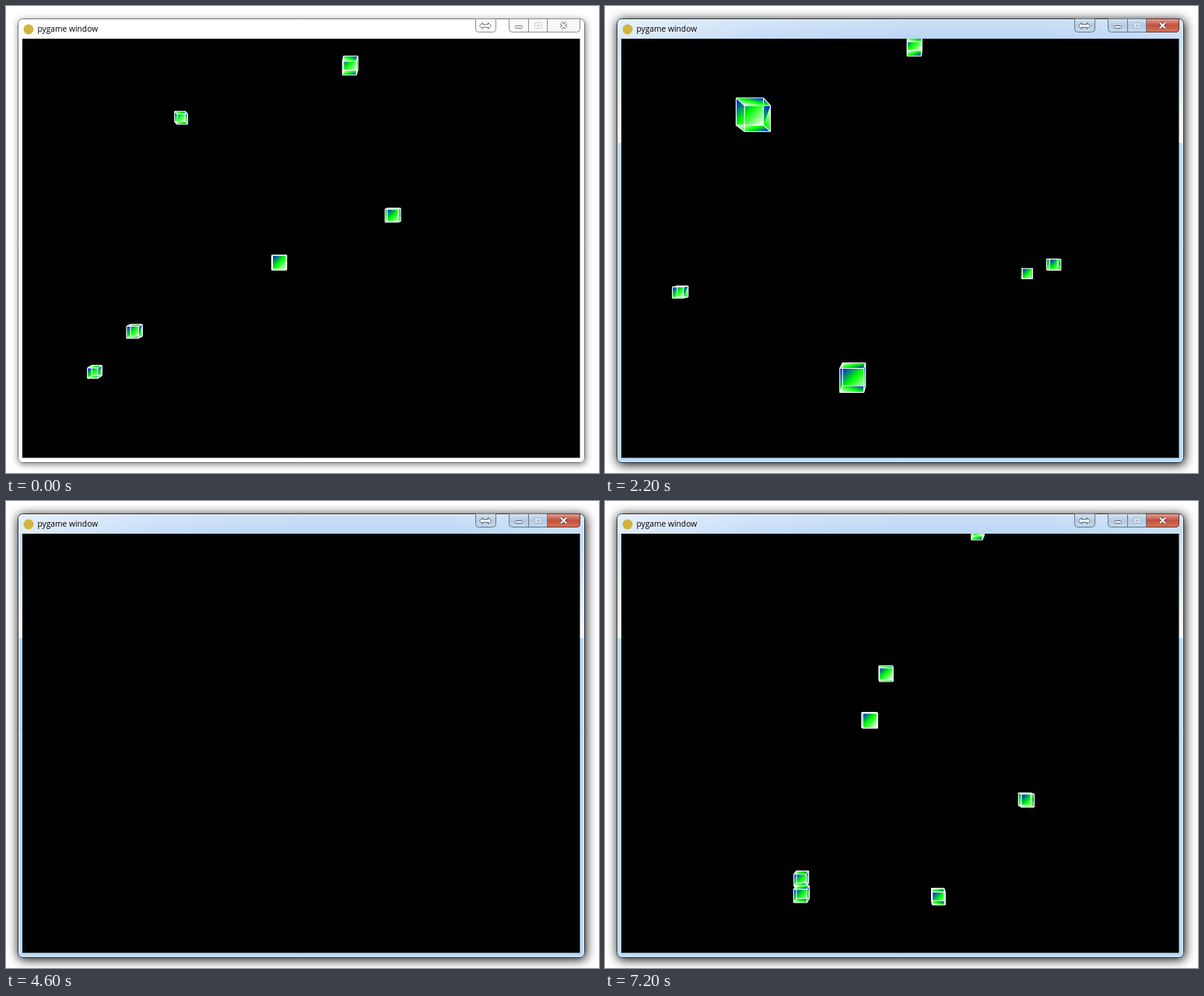
Recreate the animation shown at these times as an HTML page with a canvas. Size 762x600 px, loop 7400 ms.

```html
<!DOCTYPE html>
<html lang="en">
<head>
<meta charset="utf-8">
<title>pygame window</title>
<style>
html, body { margin: 0; width: 762px; height: 600px; overflow: hidden; background: #fff; }
canvas { display: block; }
</style>
</head>
<body>
<canvas id="stage" width="762" height="600"></canvas>
<script>
const ctx = document.getElementById('stage').getContext('2d');
const STEP = 200, STEPS = 37;
const CX = 379, CY = 311, FOCAL = 649, FAR = 100;

// Cubes stand on whole world units (x, y, z); the second batch joins during the flight
const batches = [
  { from: 0, cubes: [
    [7, -26, 72], [14, -5, 77], [-3, 2, 70], [-28, 14, 85], [-40, 24, 98], [-23, -25, 97], [41, 19, 107]
  ] },
  { from: 8, cubes: [
    [-16, -4, 102], [-10, -43, 129], [16, -12, 151], [-52, -7, 151], [13, -10, 159],
    [-61, -5, 164], [-35, 27, 183], [-38, 29, 191], [-25, -27, 232], [-24, 32, 245],
    [-5, 18, 314], [-6, 27, 314], [-47, 1, 385], [-45, -6, 391], [-37, 28, 397],
    [-23, 13, 398], [-59, 26, 400], [-58, 27, 395], [-29, -34, 409]
  ] }
];

const clamp = (v, lo, hi) => Math.min(hi, Math.max(lo, v));
const ramp = (s, from, to, amount) => amount * clamp((s - from) / (to - from), 0, 1);

// Steady flight forward; each ramp is one held arrow key
function camera(s) {
  return [
    ramp(s, 6, 7, -2) + ramp(s, 8.74, 16, 45),
    ramp(s, 7, 11, 15) + ramp(s, 11, 16, -19),
    10.35 * Math.max(0, s - 5.27)
  ].map(Math.round);
}

// Corners 0-3 ring the back, 4-7 the front
const corners = Array.from({ length: 8 }, (_, i) => [
  i & 2 ? -1 : 1,
  (i + 1) & 2 ? -1 : 1,
  i < 4 ? 1 : -1
]);
const faces = ['0123', '3267', '7654', '4501', '1562', '4037'].map(f => [...f]);

function path(points) {
  ctx.beginPath();
  points.forEach(p => ctx.lineTo(p[0], p[1]));
  ctx.closePath();
}

// Triangle shaded from green on the side a-c to a colour at the tip
function shade(a, tip, c, color) {
  const dx = c[0] - a[0], dy = c[1] - a[1], len = dx * dx + dy * dy;
  if (len < .01) return;
  const k = ((tip[0] - a[0]) * dx + (tip[1] - a[1]) * dy) / len;
  ctx.fillStyle = gradient(a[0] + dx * k, a[1] + dy * k, tip[0], tip[1], '#0f0', color);
  path([a, tip, c]);
  ctx.fill();
}

function drawCube(x, y, z) {
  if (z < 2 || z - 1 >= FAR) return;
  const p = corners.map(([i, j, k]) => {
    const u = FOCAL / Math.min(z + k, FAR);
    return [CX + (x + i) * u, CY + (y + j) * u];
  });
  const clipped = z + 1 > FAR;

  // Fixed order without depth test, so the front never hides the sides
  faces.slice(clipped ? 1 : 0).forEach(face => {
    const [a, b, c, d] = face.map(i => p[i]);
    ctx.fillStyle = '#0f0';
    path([a, b, c, d]);
    ctx.fill();
    shade(a, b, c, '#00f');
    shade(a, d, c, '#fff');
  });

  const edge = (a, b) => { ctx.moveTo(...p[a]); ctx.lineTo(...p[b]); };
  ctx.beginPath();
  for (let i = 0; i < 4; i++) {
    const next = (i + 1) % 4;
    edge(i, i + 4);
    edge(i + 4, next + 4);
    if (!clipped) edge(i, next);
  }
  ctx.strokeStyle = '#fff';
  ctx.lineWidth = 1.1;
  ctx.stroke();
}

function gradient(x0, y0, x1, y1, ...colors) {
  const g = ctx.createLinearGradient(x0, y0, x1, y1);
  colors.forEach((color, i) => g.addColorStop(i / (colors.length - 1), color));
  return g;
}

function box(x, y, w, h, r, fill, stroke) {
  ctx.beginPath();
  ctx.roundRect(x, y, w, h, r);
  if (fill) { ctx.fillStyle = fill; ctx.fill(); }
  if (stroke) { ctx.lineWidth = 1; ctx.strokeStyle = stroke; ctx.stroke(); }
}

function line(x0, y0, x1, y1, color, width) {
  ctx.beginPath();
  ctx.moveTo(x0, y0);
  ctx.lineTo(x1, y1);
  ctx.strokeStyle = color;
  ctx.lineWidth = width;
  ctx.stroke();
}

function drawArrow(x, y, color) {
  const half = [[-7.5, 0], [-3.5, -4], [-3.5, -1.8]];
  const top = [...half, ...half.map(([a, b]) => [-a, b]).reverse()];
  const bottom = top.map(([a, b]) => [a, -b]).reverse();
  path([...top, ...bottom].map(([a, b]) => [x + a, y + b]));
  ctx.fillStyle = '#fff';
  ctx.fill();
  ctx.strokeStyle = color;
  ctx.lineWidth = 1;
  ctx.stroke();
}

function drawButtons(active) {
  const edge = active ? '#64788e' : '#8d9196';
  const glyph = active ? '#59636f' : '#72767c';
  const faded = active ? '#a0b2c6' : '#c9cbce';
  const face = active ? gradient(0, 16, 0, 34, '#dbe7f4', '#b5cae1', '#c6daee') : '#f8f8f9';
  box(603.5, 16.5, 26, 17, [0, 0, 4, 4], face, edge);
  box(646.5, 16.5, 91, 17, [0, 0, 4, 4], face, edge);
  if (active) {
    const red = gradient(0, 16, 0, 34, '#e5a99d', '#c1503d', '#d6795d');
    box(695.5, 16.5, 42, 17, [0, 0, 4, 0], red, '#6d3835');
  }
  line(671.5, 17, 671.5, 33, edge, 1);
  line(695.5, 17, 695.5, 33, edge, 1);

  drawArrow(616, 25.5, glyph);
  box(654.5, 25.5, 9, 3, 1, '#fff', glyph);
  box(679.5, 21.5, 9, 7, 1, active ? '#dce7f2' : '#fff', faded);
  box(682.5, 24.5, 3, 1.5, 0, null, faded);
  for (const [color, width] of [[active ? '#713d3c' : glyph, 4], ['#fff', 2.1]]) {
    line(713, 21.5, 720, 28.5, color, width);
    line(720, 21.5, 713, 28.5, color, width);
  }
}

function drawWindow(active) {
  ctx.fillStyle = '#fff';
  ctx.fillRect(0, 0, 762, 600);
  ctx.save();
  ctx.shadowColor = active ? '#000' : 'rgba(0,0,0,.5)';
  ctx.shadowBlur = active ? 14 : 9;
  ctx.shadowOffsetX = 1;
  ctx.shadowOffsetY = 2;
  box(15, 16, 729, 571, 6, active ? '#bbdcf8' : '#fff');
  ctx.restore();

  if (active) {
    ctx.fillStyle = gradient(0, 42, 0, 176, '#c6dff8', '#dcebfa', '#fafcfe');
    ctx.fillRect(15, 42, 729, 134);
    box(15, 16, 729, 26, [6, 6, 0, 0], gradient(15, 0, 744, 0, '#dbeafb', '#c3dbf6', '#b8d4f3', '#b8d4f3', '#c4ddf7'));
    box(15, 16, 729, 26, [6, 6, 0, 0], gradient(0, 16, 0, 42, 'rgba(255,255,255,.3)', 'rgba(255,255,255,.05)'));
  }
  box(16.5, 17.5, 726, 568, 5, null, 'rgba(255,255,255,.6)');
  box(15.5, 16.5, 728, 570, 6, null, active ? '#2c3440' : '#777');
  ctx.fillStyle = '#000';
  ctx.fillRect(21, 42, 716.5, 538.5);

  ctx.beginPath();
  ctx.arc(29, 30, 6.5, 0, Math.PI * 2);
  ctx.fillStyle = '#d3b43c';
  ctx.fill();

  ctx.save();
  ctx.font = '10.25px "Open Sans", "Noto Sans", sans-serif';
  ctx.fillStyle = '#000';
  if (active) {
    ctx.shadowColor = '#fff';
    ctx.shadowBlur = 8;
  }
  ctx.fillText('pygame window', 40.5, 33);
  ctx.restore();
  drawButtons(active);
}

function draw(step) {
  drawWindow(step > 0);
  ctx.save();
  ctx.beginPath();
  ctx.rect(21, 42, 716.5, 538.5);
  ctx.clip();
  const [cx, cy, cz] = camera(step);
  for (const { from, cubes } of batches) {
    if (step >= from) cubes.forEach(([x, y, z]) => drawCube(x + cx, y + cy, z - cz));
  }
  ctx.restore();
}

const start = performance.now();
let shown = -1;
function tick() {
  const step = Math.floor((performance.now() - start) / STEP) % STEPS;
  if (step !== shown) draw(shown = step);
  requestAnimationFrame(tick);
}
tick();
</script>
</body>
</html>
```
